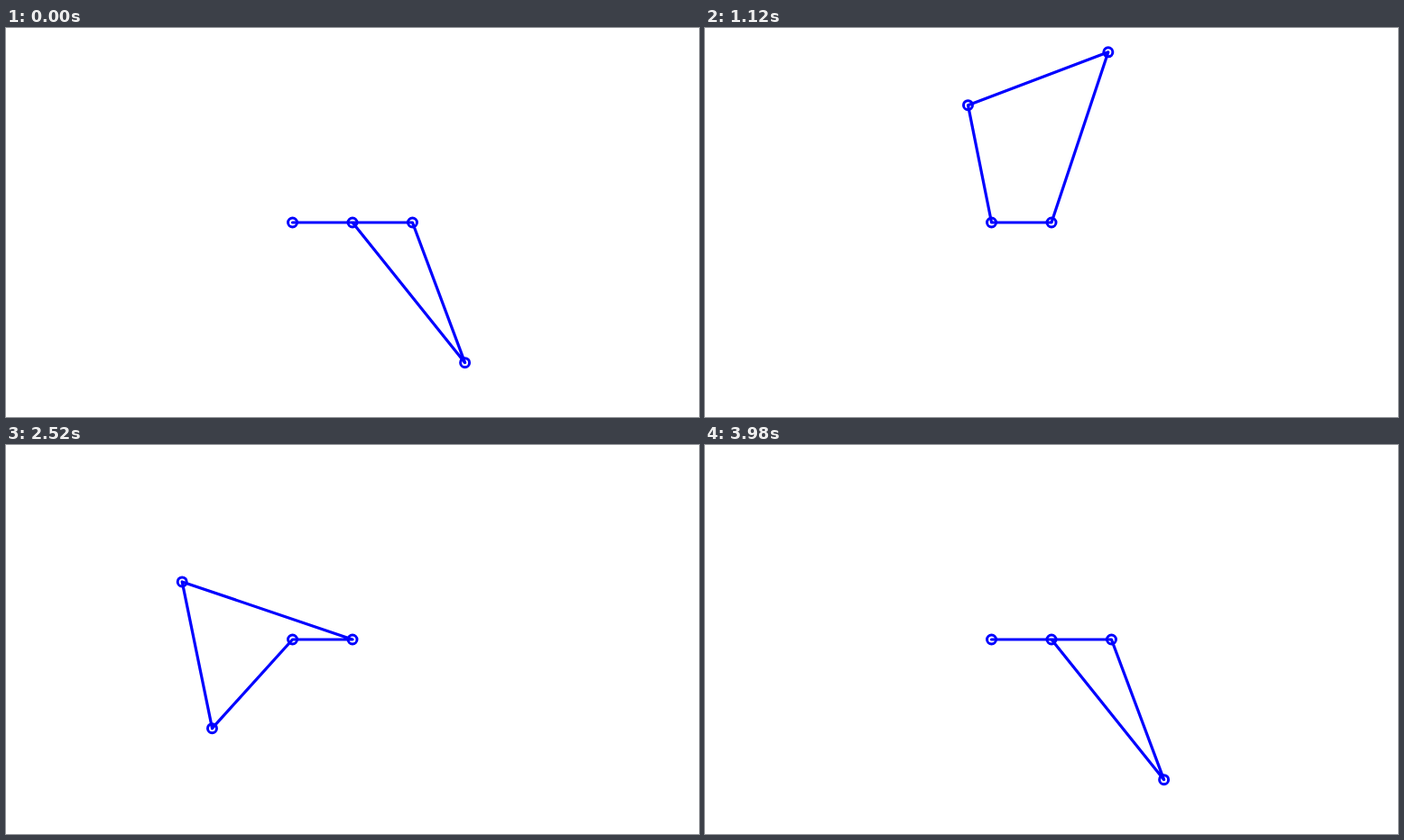
An HTML page that plays this animation: 768 by 432 pixels, repeating every 4 s.

```html
<!DOCTYPE html>
<html lang="en">
<head>
<meta charset="utf-8">
<title>Four-bar linkage</title>
<style>
  html, body { margin: 0; width: 100%; height: 100%; overflow: hidden; background: #fff; }
  svg { display: block; width: 768px; height: 432px; }
  g { fill: none; stroke: #00f; stroke-width: 3; }
  polygon { stroke-width: 3.2; stroke-linejoin: round; }
</style>
</head>
<body>
<svg viewBox="0 0 768 432">
  <g>
    <polygon id="bars"/>
    <circle r="5"/><circle r="5"/><circle r="5"/><circle r="5"/>
  </g>
</svg>
<script>
  const UNIT = 432 / 6.5;
  const CRANK = 2 * UNIT, COUPLER = 2.5 * UNIT, ROCKER = 3 * UNIT;
  const STEP = 20, STEPS = 200;
  const pivotA = [384 - UNIT, 216], pivotD = [384, 216];
  const bars = document.getElementById('bars');
  const joints = document.querySelectorAll('circle');

  function crankEnd(angle) {
    return [pivotA[0] + CRANK * Math.cos(angle), pivotA[1] - CRANK * Math.sin(angle)];
  }

  // Intersection of the rocker circle and the coupler circle, clockwise side
  function couplerEnd([bx, by]) {
    const dx = bx - pivotD[0], dy = by - pivotD[1];
    const dist = Math.hypot(dx, dy);
    const along = (ROCKER ** 2 - COUPLER ** 2 + dist ** 2) / (2 * dist);
    const across = Math.sqrt(Math.max(0, ROCKER ** 2 - along ** 2));
    return [
      pivotD[0] + (along * dx - across * dy) / dist,
      pivotD[1] + (along * dy + across * dx) / dist
    ];
  }

  function draw(time) {
    const step = Math.floor(time / STEP + 1e-6) % STEPS;
    const b = crankEnd(2 * Math.PI * step / (STEPS - 1));
    const points = [pivotA, b, couplerEnd(b), pivotD];
    bars.setAttribute('points', points.join(' '));
    points.forEach(([x, y], i) => {
      joints[i].setAttribute('cx', x);
      joints[i].setAttribute('cy', y);
    });
  }

  const start = performance.now();
  function tick() {
    draw(performance.now() - start);
    requestAnimationFrame(tick);
  }
  tick();
</script>
</body>
</html>
```
